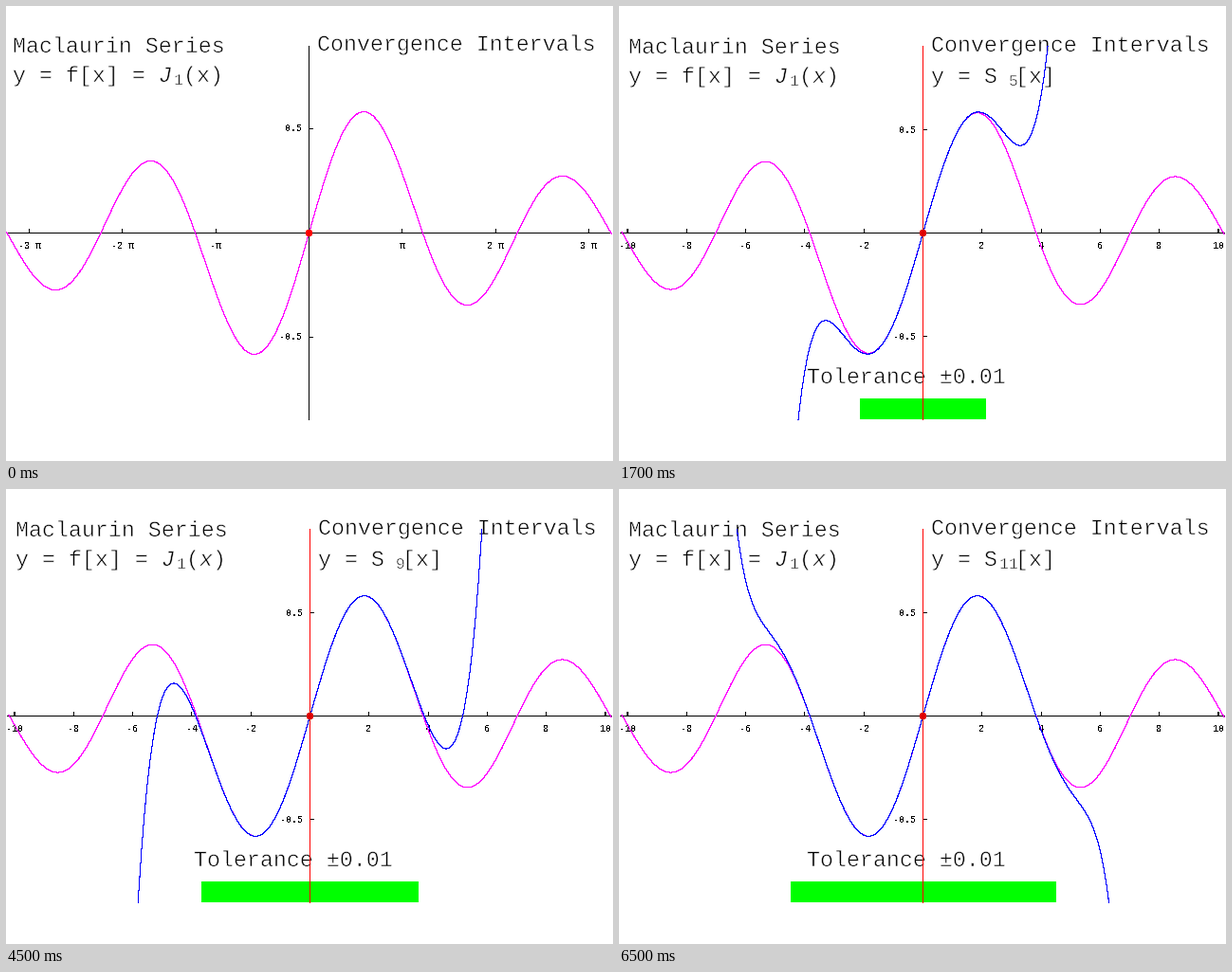
These frames come from a looping animation (640 px wide and 480 px high, 8 s). A matplotlib script:

```python
import math

import matplotlib.pyplot as plt
import numpy as np
from matplotlib.animation import FuncAnimation
from matplotlib.patches import Circle, Rectangle
from matplotlib.patheffects import Stroke

PX = 0.72  # points per pixel at 100 dpi
HAIRLINE = 0.02 * PX  # aliased lines fill every pixel they touch
TOP, BOTTOM = 42, 437
BIG, SUB, SMALL = 23.3, 16.5, 10
# polynomial order -> half width of its convergence bar in pixels
HALF_WIDTH = {5: 66.5, 7: 89, 9: 114.5, 11: 140}
ORDERS = [None, 5, 7, 9, 11]

fig = plt.figure(figsize=(6.4, 4.8), dpi=100, facecolor="white")
ax = fig.add_axes([0, 0, 1, 1])

xs = np.linspace(-10.2, 10.2, 161)
theta = (np.arange(200) + 0.5) * math.pi / 200
bessel = np.cos(theta - xs[:, None] * np.sin(theta)).mean(axis=1)


def partial_sum(x, order):
    return sum((-1) ** k * (x / 2) ** (2 * k + 1)
               / (math.factorial(k) * math.factorial(k + 1))
               for k in range((order + 1) // 2))


def line(x, y, color="black"):
    artist, = ax.plot(x, y, color=color, lw=HAIRLINE, antialiased=False,
                      snap=False)
    artist.set_clip_path(Rectangle((0, TOP), 640, BOTTOM - TOP,
                                   transform=ax.transData))


def text(x, y, label, size=BIG, **style):
    return ax.text(x, y, label, fontsize=size * PX, va="baseline", zorder=1,
                   family="Liberation Mono", **style)


def thin_text(x, y, label, size=BIG, **style):
    # a white outline slims the strokes
    text(x, y, label, size, **style).set_path_effects(
        [Stroke(linewidth=0.6 * PX, foreground="white")])


def tick_label(x, y, label, ha):
    text(x, y, label, SMALL, ha=ha, antialiased=False)


def draw_axes(cx, cy, sy, x_ticks):
    line([cx - 319, cx + 318], [cy, cy])
    line([cx, cx], [TOP, BOTTOM])
    for x, label in x_ticks:
        line([x, x], [cy - 4, cy])
        tick_label(x, cy + 17, label, "center")
    for value in (0.5, -0.5):
        y = cy - sy * value
        line([cx, cx + 4], [y, y])
        tick_label(cx - 7, y + 3, str(value), "right")


def draw_titles(x, dy, x_style):
    thin_text(x, 49 + dy, "Maclaurin Series")
    thin_text(x, 80 + dy, "y = f[x] = ")
    thin_text(x + 154, 80 + dy, "J", style="italic")
    thin_text(x + 170, 83 + dy, "1", SUB)
    thin_text(x + 180, 80 + dy, "(")
    thin_text(x + 194, 80 + dy, "x", style=x_style)
    thin_text(x + 208, 80 + dy, ")")


def draw_series(order, cx, cy, sx, sy):
    half = HALF_WIDTH[order]
    ax.add_patch(Rectangle((cx - half, 414), 2 * half, 22, color="#00ff00",
                           lw=0, antialiased=False))
    thin_text(198, 398, "Tolerance ±0.01")
    thin_text(329, 81, "y = S")
    thin_text(401, 84, f"{order:2d}", SUB)
    thin_text(418, 81, "[x]")
    x = np.linspace(-7, 7, 141)
    line(cx + sx * x, cy - sy * partial_sum(x, order), "#0000ff")
    line([cx, cx], [TOP, BOTTOM], "#ff0000")


def pi_label(n):
    sign = "-" if n < 0 else ""
    return sign + ("π" if abs(n) == 1 else f"{abs(n)} π")


def draw(frame):
    order = ORDERS[(frame + 3) // 4]
    ax.clear()
    ax.axis("off")
    ax.set(xlim=(0, 640), ylim=(480, 0))
    if order is None:
        cx, cy, sx, sy = 319.5, 239.5, 31.3, 220
        ticks = [(cx + sx * n * math.pi, pi_label(n))
                 for n in range(-3, 4) if n]
    else:
        cx, cy, sx, sy = 320.5, 239.5, 31.15, 218
        ticks = [(cx + sx * n, str(n)) for n in range(-10, 11, 2) if n]

    draw_axes(cx, cy, sy, ticks)
    line(cx + sx * xs, cy - sy * bessel, "#ff00ff")
    if order is None:
        draw_titles(7, 0, "normal")
        thin_text(328, 47, "Convergence Intervals")
    else:
        draw_titles(10, 1, "italic")
        thin_text(329, 48, "Convergence Intervals")
        draw_series(order, cx, cy, sx, sy)
    ax.add_patch(Circle((cx, cy), 3.4, lw=0, antialiased=False, zorder=5,
                        color="#ff0000" if order is None else "#e00000"))
    return []


anim = FuncAnimation(fig, draw, frames=16, interval=500, repeat=True,
                     repeat_delay=0, init_func=lambda: [])
plt.show()
```
